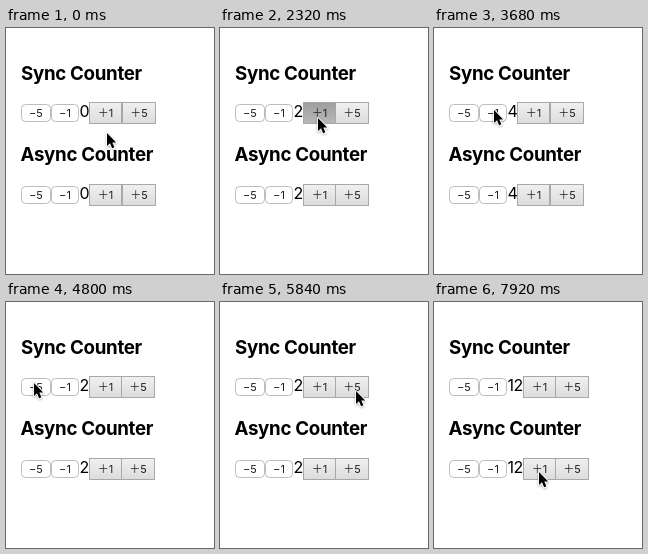
Recreate the animation shown at these times as an HTML page. Size 208 px wide and 246 px high, loop 8000 ms.

```html
<!DOCTYPE html>
<html lang="en">
<head>
<meta charset="utf-8">
<title>Counters</title>
<style>
  html, body { margin: 0; width: 100%; height: 100%; overflow: hidden; background: #fff; }
  svg { display: block; font-family: Inter, "Noto Sans CJK JP", "Noto Sans CJK SC", sans-serif; font-feature-settings: "calt" 0; }
  .title { font-size: 18.72px; font-weight: 700; letter-spacing: -.31px; fill: #000; }
  .value { font-size: 16px; letter-spacing: -.4px; fill: #000; }
  .label { font-size: 11px; text-anchor: middle; fill: #222; }
  .round rect { fill: #fff; stroke: #bdbdbd; }
  .square rect { fill: url(#face); stroke: #a8a8a8; }
  .square.down rect { fill: url(#faceDown); }
  .round.down rect { fill: url(#blue); stroke: #3b82e6; }
  .round.down .label { fill: #fff; }
</style>
</head>
<body>
<svg width="208" height="246" viewBox="0 0 208 246">
  <defs>
    <linearGradient id="face" x2="0" y2="1">
      <stop stop-color="#f0f0f0"/><stop offset="1" stop-color="#dcdcdc"/>
    </linearGradient>
    <linearGradient id="faceDown" x2="0" y2="1">
      <stop stop-color="#9e9e9e"/><stop offset="1" stop-color="#b8b8b8"/>
    </linearGradient>
    <linearGradient id="blue" x2="0" y2="1">
      <stop stop-color="#66abf9"/><stop offset="1" stop-color="#1670ee"/>
    </linearGradient>
    <filter id="soft" x="-50%" y="-50%" width="200%" height="200%">
      <feDropShadow dx="0" dy="1" stdDeviation=".8" flood-opacity=".35"/>
    </filter>
  </defs>
  <text class="title" x="15" y="52">Sync Counter</text>
  <text class="title" x="14.5" y="133">Async Counter</text>
  <g id="rows"></g>
  <path id="cursor" filter="url(#soft)" d="M1 2V15L4 12.3 6.1 17.3 8.4 16.3 6.3 11.4H10.2Z"
        fill="#000" stroke="#fff" stroke-width="1.6" stroke-linejoin="round" paint-order="stroke"/>
</svg>
<script>
const LOOP = 8000, TICK = 80, HOLD = 140;

// Where the pointer goes and what it clicks there; gaps between clicks shrink by pace
const visits = [
  { start: 320, steps: 4, x: 97, y: 88, amount: 1, clicks: 5, first: 1200, gap: 720, pace: 2 / 3 },
  { start: 3200, steps: 5, x: 59, y: 80, amount: -1, clicks: 3, first: 3680, gap: 240 },
  { start: 4560, steps: 4, x: 27, y: 79, amount: -5, clicks: 1, first: 4960 },
  { start: 5200, steps: 6, x: 135, y: 87, amount: 5, clicks: 3, first: 5840, gap: 200 },
  { start: 7120, steps: 3, x: 149, y: 111 },
  { start: 7520, steps: 6, x: 104, y: 168 }
];

const button = (kind, amount, text, x, y, w, h, r) => `
  <g class="${kind}" data-amount="${amount}">
    <rect x="${x + .5}" y="${y + .5}" width="${w - 1}" height="${h - 1}" rx="${r}"/>
    <text class="label" x="${x + w / 2}" y="89">${text}</text>
  </g>`;

const row = y => `
  <g transform="translate(0 ${y})">
    ${button('round', -5, '−5', 15, 76, 30, 18, 4)}
    ${button('round', -1, '−1', 45, 76, 28, 18, 4)}
    <text class="value" x="73.5" y="89">0</text>
    ${button('square', 1, '＋1', 0, 74, 33, 22, 0)}
    ${button('square', 5, '＋5', 0, 74, 34, 22, 0)}
  </g>`;

const rows = document.getElementById('rows');
const cursor = document.getElementById('cursor');
rows.innerHTML = row(0) + row(82);
const values = rows.querySelectorAll('.value');
const topButtons = rows.firstElementChild.querySelectorAll('[data-amount]');

function cursorAt(t) {
  let x = 100, y = 103;
  for (const v of visits) {
    if (t < v.start) break;
    const p = Math.min(1, ((t - v.start) / TICK + 1) / v.steps);
    const e = p * p * (3 - 2 * p);
    x += (v.x - x) * e;
    y += (v.y - y) * e;
  }
  return [Math.round(x), Math.round(y)];
}

function counterAt(t) {
  let count = 0, pressed = 0;
  for (const { amount, clicks = 0, first, gap = 0, pace = 1 } of visits) {
    let release = first, wait = gap;
    for (let i = 0; i < clicks; i++) {
      if (t >= release) count += amount;
      else if (t >= release - HOLD) pressed = amount;
      release += wait;
      wait *= pace;
    }
  }
  return { count, pressed };
}

// The plus buttons follow the width of the number
function place(selector, x) {
  rows.querySelectorAll(selector).forEach(b => b.setAttribute('transform', `translate(${Math.round(x)} 0)`));
}

function draw(t) {
  const { count, pressed } = counterAt(t);
  values.forEach(v => { v.textContent = count; });
  const left = 73.5 + values[0].getComputedTextLength();
  place('[data-amount="1"]', left);
  place('[data-amount="5"]', left + 32.3);
  topButtons.forEach(b => b.classList.toggle('down', +b.dataset.amount === pressed));
  cursor.setAttribute('transform', `translate(${cursorAt(t)})`);
}

const begin = performance.now();
function frame() {
  const t = (performance.now() - begin) % LOOP;
  draw(Math.floor(t / TICK) * TICK);
  requestAnimationFrame(frame);
}
draw(0);
requestAnimationFrame(frame);
</script>
</body>
</html>
```
